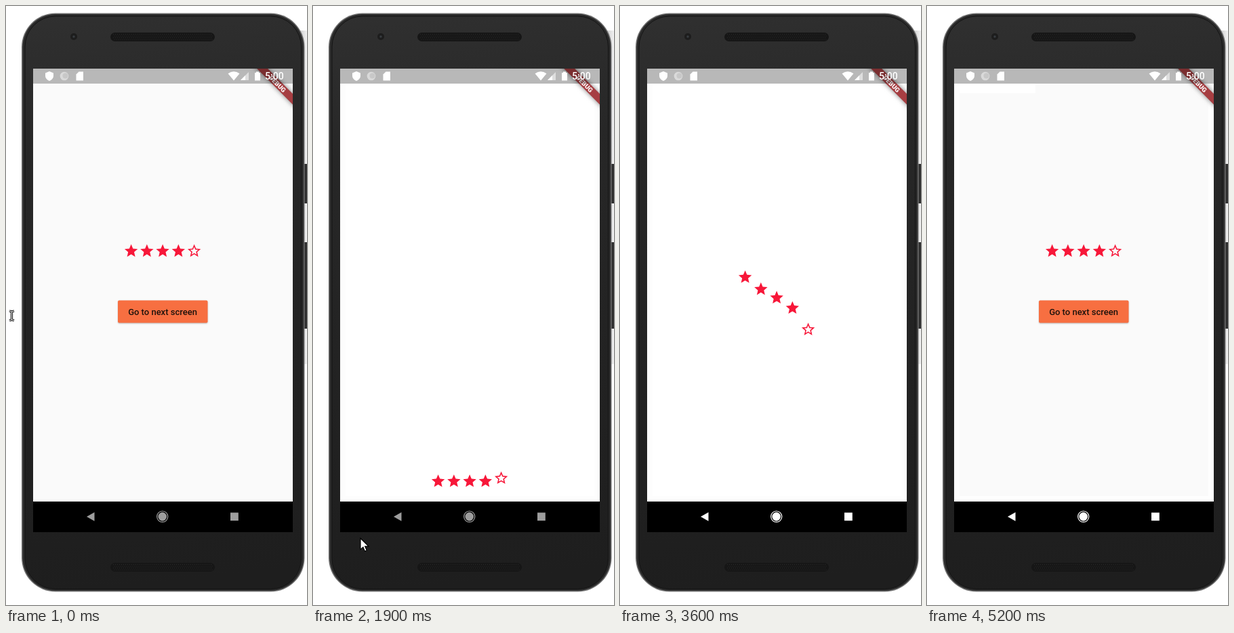
Animation of 444x880 px, one loop 5400 ms. Source, as an HTML page with a canvas:

```html
<!DOCTYPE html>
<html lang="en">
<head>
<meta charset="utf-8">
<title>Star rating transition</title>
<style>
html, body { margin: 0; width: 100%; height: 100%; overflow: hidden; background: #fff; }
canvas { display: block; }
</style>
</head>
<body>
<canvas id="stage" width="444" height="880"></canvas>
<script>
const ctx = document.getElementById('stage').getContext('2d');
const LOOP = 5400, STEP = 100;
const TOP = 359.2, BOTTOM = 697.4;
const RED = '#f71739';

const starFull = new Path2D('M12 17.27L18.18 21l-1.64-7.03L22 9.24l-7.19-.61L12 2 9.19 8.63 2 9.24l5.46 4.73L5.82 21z');
const starLine = new Path2D('M22 9.24l-7.19-.62L12 2 9.19 8.63 2 9.24l5.46 4.73L5.82 21 12 17.27 18.18 21l-1.63-7.03L22 9.24zM12 15.4l-3.76 2.27 1-4.28-3.32-2.88 4.38-.38L12 6.1l1.71 4.04 4.38.38-3.32 2.88 1 4.28L12 15.4z');
const shield = new Path2D('M64 96l6 2.5v4c0 3.5-2.5 6.2-6 7.5-3.5-1.3-6-4-6-7.5v-4z');
const sdCard = new Path2D('M107.5 96.5h6.5v13h-10.5v-9z');
const wifi = new Path2D('M327.5 99.2q8.5-6 17 0l-8.5 10.3z');
const arrow = new Path2D('M0 0V16.5L3.9 12.9 6.5 19 9.3 17.8 6.7 11.9H12z');

// Start and duration of each star's flight, in ms
const fall = [[810, 769], [810, 819], [810, 964], [810, 1064], [810, 1283]];
const rise = [[2980, 1010], [2970, 1140], [2932, 1290], [2978, 1289], [2990, 1440]];

// Pointer keys: time, x, y
const approach = [[0, 8, 446], [100, 26, 452], [300, 100, 459], [500, 178, 449], [600, 192, 447]];
const toBack = [[1500, 192, 447], [1650, 130, 610], [1800, 77, 752], [1900, 70, 782],
  [2100, 94, 813], [2400, 123, 760]];

const clamp = v => Math.max(0, Math.min(1, v));
const ramp = (t, a, b) => clamp((t - a) / (b - a));

// Cubic bezier (.4, 0, .2, 1), solved by bisection
function ease(x) {
  if (x <= 0 || x >= 1) return clamp(x);
  let lo = 0, hi = 1, s = .5;
  for (let i = 0; i < 24; i++) {
    s = (lo + hi) / 2;
    const v = 1.2 * s * (1 - s) ** 2 + .6 * s * s * (1 - s) + s ** 3;
    if (v < x) lo = s; else hi = s;
  }
  return s * s * (3 - 2 * s);
}

function along(keys, t) {
  let a = keys[0];
  for (const b of keys) {
    if (t <= b[0]) {
      const k = b === a ? 0 : (t - a[0]) / (b[0] - a[0]);
      return [a[1] + (b[1] - a[1]) * k, a[2] + (b[2] - a[2]) * k];
    }
    a = b;
  }
  return [a[1], a[2]];
}

function rect(x, y, w, h, fill) {
  ctx.fillStyle = fill;
  ctx.fillRect(x, y, w, h);
}

function round(x, y, w, h, r, fill, line) {
  ctx.beginPath();
  ctx.roundRect(x, y, w, h, r);
  if (fill) { ctx.fillStyle = fill; ctx.fill(); }
  if (line) { ctx.strokeStyle = line; ctx.stroke(); }
}

function disc(x, y, r, fill) {
  ctx.beginPath();
  ctx.arc(x, y, r, 0, Math.PI * 2);
  ctx.fillStyle = fill;
  ctx.fill();
}

function poly(points, fill) {
  ctx.beginPath();
  points.forEach(p => ctx.lineTo(p[0], p[1]));
  ctx.closePath();
  ctx.fillStyle = fill;
  ctx.fill();
}

function label(str, x, y, font, fill, align = 'left') {
  ctx.font = font + ' Roboto, sans-serif';
  ctx.textAlign = align;
  ctx.fillStyle = fill;
  ctx.fillText(str, x, y);
}

function speaker(y) {
  round(154, y, 154, 13, 6.5, '#161616');
  ctx.fillStyle = '#2b2b2b';
  for (let r = 0; r < 4; r++)
    for (let x = 158 + (r % 2) * 1.5; x < 305; x += 3) ctx.fillRect(x, y + 2 + r * 2.6, 1, 1);
}

function phone() {
  const shade = ctx.createLinearGradient(434, 0, 444, 0);
  shade.addColorStop(0, '#d0d0d0');
  shade.addColorStop(1, '#f2f2f2');
  rect(434, 36, 10, 490, shade);
  rect(439, 232, 5, 58, '#303030');
  rect(439, 347, 5, 127, '#303030');

  // Metal rim, dark seam, then the front glass
  round(23, 10.5, 417.5, 850, 50, '#6e6e6e');
  round(24.5, 12, 414.5, 847, 48.5, '#2a2a2a');
  const face = ctx.createLinearGradient(24, 10, 120, 860);
  face.addColorStop(0, '#303030');
  face.addColorStop(.25, '#272727');
  face.addColorStop(1, '#1e1e1e');
  ctx.lineWidth = 1;
  round(28, 15, 407.5, 841.5, 45, face, '#131313');

  speaker(39);
  speaker(818);
  disc(100, 45, 5, '#1d1d1d');
  disc(100, 45, 1.7, '#383c40');
}

function statusBar() {
  rect(40, 92, 383, 22, 'rgba(0,0,0,.265)');
  ctx.fillStyle = '#fff';
  ctx.fill(shield);
  ctx.fill(sdCard);
  ctx.fill(wifi);
  disc(86, 103, 6.3, '#dadada');
  disc(87.5, 102.5, 4, '#c8c8c8');
  poly([[358, 97], [358, 109], [346, 109]], '#dedede');
  poly([[353, 102], [353, 109], [346, 109]], '#fff');
  rect(367, 98, 8, 11.5, '#fff');
  rect(369, 96.5, 4, 2, '#fff');
  label('5:00', 382, 108, '500 14px', '#fff');
}

function banner() {
  ctx.save();
  ctx.beginPath();
  ctx.rect(40, 92, 383, 636);
  ctx.clip();
  ctx.translate(400.6, 114.4);
  ctx.rotate(Math.PI / 4);
  ctx.shadowColor = 'rgba(0,0,0,.5)';
  ctx.shadowBlur = 7;
  rect(-50, -5.6, 100, 11.2, '#a63e42');
  ctx.shadowBlur = 0;
  label('DEBUG', 0, 3.4, '900 9.5px', '#fff', 'center');
  ctx.restore();
}

function button(t) {
  ctx.save();
  ctx.shadowColor = 'rgba(0,0,0,.25)';
  ctx.shadowBlur = 2;
  ctx.shadowOffsetY = 1;
  round(165, 432.5, 132.5, 33, 2, t >= 700 && t < 1300 ? '#f06b3d' : '#f76f41');
  ctx.restore();
  if (t > 700 && t < 1300) {
    ctx.save();
    ctx.beginPath();
    ctx.rect(165, 432.5, 132.5, 33);
    ctx.clip();
    disc(192, 448, 12 + 110 * ramp(t, 700, 1000), 'rgba(90,40,20,.12)');
    ctx.restore();
  }
  label('Go to next screen', 231, 454, '500 13px', '#1d120c', 'center');
}

function pages(t) {
  rect(40, 92, 383, 636, '#fafafa');
  const cover = t < 4000 ? ramp(t, 820, 1150) : 1 - ramp(t, 4900, 5200);
  if (cover < 1) button(t);
  if (cover > 0) {
    ctx.globalAlpha = cover;
    rect(40, 114, 383, 614, '#fdfdfd');
    rect(48, 114, 367, 606, '#fff');
    ctx.globalAlpha = 1;
  }
  if (t >= 5000) {
    rect(40, 114, 120, 14, '#fff');
    rect(40, 114, 8, 614, '#fefefe');
    rect(415, 128, 8, 600, '#fefefe');
    rect(40, 720, 383, 8, '#fefefe');
  }
}

function stars(t) {
  for (let i = 0; i < 5; i++) {
    const [start, span] = (t < 2800 ? fall : rise)[i];
    const k = ease((t - start) / span);
    const y = TOP + (BOTTOM - TOP) * (t < 2800 ? k : 1 - k);
    ctx.save();
    ctx.translate(184.6 + 23.25 * i, y);
    ctx.scale(.969, .969);
    ctx.translate(-12, -11.5);
    ctx.fillStyle = RED;
    if (i < 4) ctx.fill(starFull);
    else ctx.fill(starLine, 'evenodd');
    ctx.restore();
  }
}

function navBar(t) {
  rect(40, 728, 383, 45, '#000');
  if (t >= 2800 && t < 3300) {
    const w = 40 + 60 * ramp(t, 2700, 3000);
    const tone = 34 - 17 * ramp(t, 3000, 3200);
    round(125 - w / 2, 728, w, 45, 20, `rgb(${tone},${tone},${tone})`);
  }
  const tint = t < 2800 ? '#9d9d9d' : '#fff';
  poly([[119, 750.3], [130.5, 743.8], [130.5, 756.8]], tint);
  disc(230.7, 750.1, 6.3, tint);
  ctx.beginPath();
  ctx.arc(230.7, 750.1, 8.1, 0, Math.PI * 2);
  ctx.lineWidth = 1.2;
  ctx.strokeStyle = tint;
  ctx.stroke();
  rect(331, 744.3, 11.8, 11.8, tint);
}

function pointer(x, y) {
  ctx.save();
  ctx.translate(x, y);
  ctx.lineWidth = 1.2;
  ctx.fillStyle = '#fff';
  ctx.strokeStyle = '#000';
  ctx.fill(arrow);
  ctx.stroke(arrow);
  ctx.restore();
}

function textCursor(x, y) {
  ctx.beginPath();
  for (const side of [-3.5, 3.5]) {
    ctx.moveTo(x + side, y - 7);
    ctx.lineTo(x, y - 6);
    ctx.lineTo(x, y + 6);
    ctx.lineTo(x + side, y + 7);
  }
  ctx.lineWidth = 3.2;
  ctx.strokeStyle = '#111';
  ctx.stroke();
  ctx.lineWidth = 1;
  ctx.strokeStyle = '#fff';
  ctx.stroke();
}

function mouse(t) {
  if (t < 100) textCursor(8.5, 455);
  else if (t < 1500) pointer(...along(approach, t));
  else if (t < 2800) pointer(...along(toBack, t));
  else if (t >= 4100 && t < 5000) pointer(109, -18);
}

function draw(now) {
  const t = Math.floor((now % LOOP) / STEP) * STEP;
  rect(0, 0, 444, 880, '#fff');
  phone();
  pages(t);
  banner();
  statusBar();
  stars(t);
  navBar(t);
  mouse(t);
}

let origin;
function tick(now) {
  origin ??= now;
  draw(now - origin);
  requestAnimationFrame(tick);
}
draw(0);
requestAnimationFrame(tick);
</script>
</body>
</html>
```
